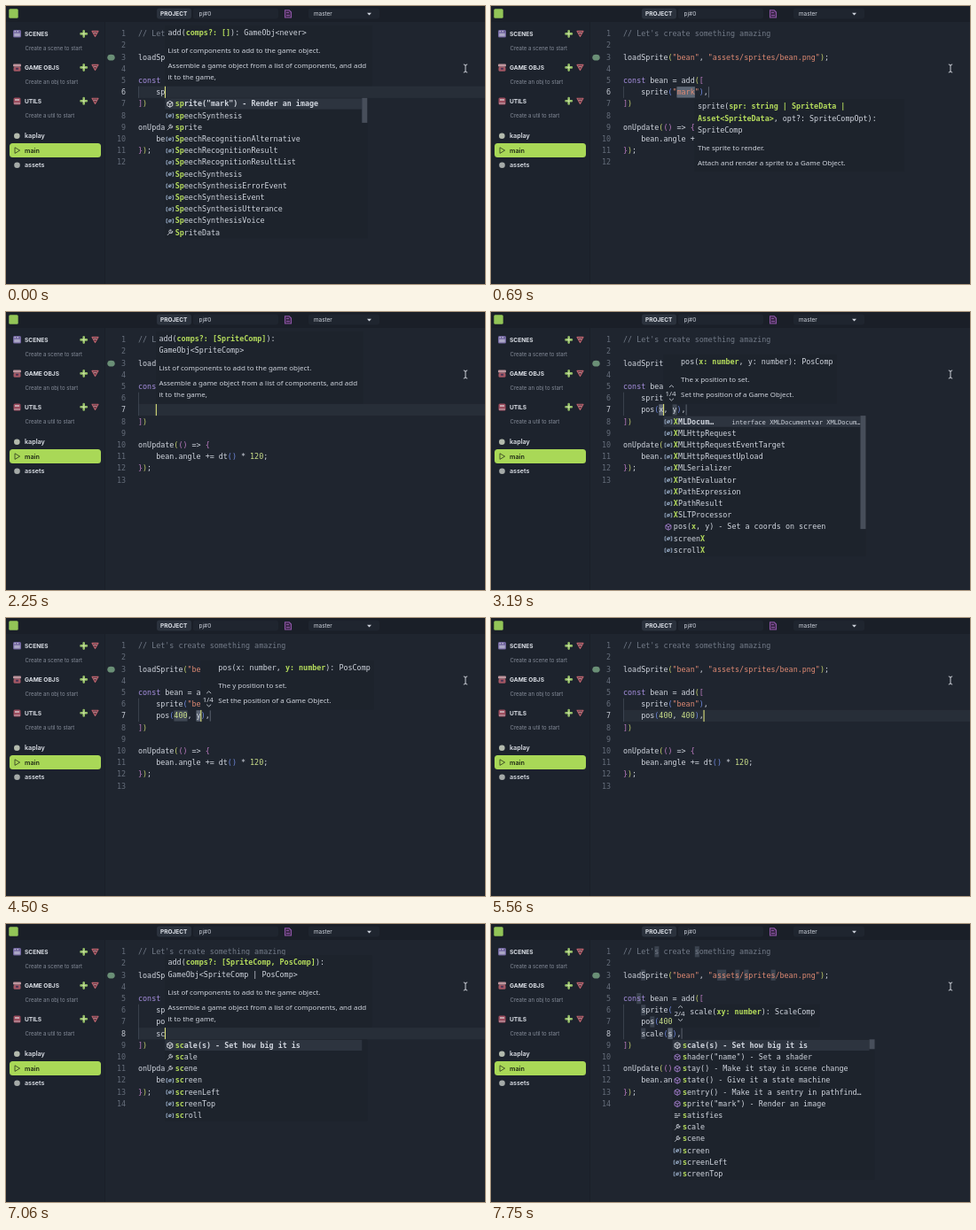
An HTML page that plays this animation: 540x314 px, repeating every 8000 ms.

```html
<!DOCTYPE html>
<html lang="en">
<head>
<meta charset="utf-8">
<title>Code editor</title>
<style>
  html, body { margin: 0; width: 100%; height: 100%; overflow: hidden; background: #1f252f; }
  svg { display: block; width: 540px; height: 314px; }
  text { white-space: pre; font: 8.39px "DejaVu Sans Mono", monospace; fill: #d0d5de; }
  .ui { font-family: Inter, sans-serif; }
  .doc { font: 7.96px "Noto Sans", sans-serif; }
  .b { font-weight: 700; }
  .hit { font-weight: 700; fill: #b5dc5c; }
</style>
</head>
<body>
<svg viewBox="0 0 540 314" xmlns="http://www.w3.org/2000/svg">
  <g id="shell"></g>
  <g id="editor"></g>
  <g id="pointer" fill="none" stroke="#c9cdd5" stroke-width="1">
    <path d="M515.8 66q2.2 0 2.2 1.4q0-1.4 2.2-1.4M518 67v7M515.8 75q2.2 0 2.2-1.4q0 1.4 2.2 1.4"/>
  </g>
</svg>
<script>
const LOOP = 8000, CW = 5.05, LH = 13.2, LEFT = 149, TOP = 24.7, INDENT = 4;
const $ = id => document.getElementById(id);
const esc = s => s.replace(/&/g, '&amp;').replace(/</g, '&lt;').replace(/>/g, '&gt;');
const rect = (x, y, w, h, fill, more = '') =>
  `<rect x="${x}" y="${y}" width="${w}" height="${h}" fill="${fill}" ${more}/>`;
const path = (d, stroke, more = 'fill="none"') => `<path d="${d}" stroke="${stroke}" ${more}/>`;
const span = (s, fill) => `<tspan fill="${fill}">${esc(s)}</tspan>`;
// y is the visual middle of the line
const raw = (x, y, inner, more = '') => `<text x="${x}" y="${y + 2.9}" ${more}>${inner}</text>`;
const ui = (x, y, s, size, fill, weight = 400) =>
  `<text class="ui" x="${x}" y="${y + size * .36}" style="font-size:${size}px;font-weight:${weight};fill:${fill}">${esc(s)}</text>`;

/* ---------- static shell ---------- */
function section(y, title, hint, icon) {
  return icon + ui(21, y, title, 6.6, '#dde1e8', 700) + ui(21.5, y + 16.2, hint, 6, '#858c99') +
    path(`M87.7 ${y - 3.2}v6.4M84.5 ${y}h6.4`, '#93bd66', 'stroke-width="2.6" stroke-linecap="round"') +
    path(`M87.7 ${y - 2}v4M85.7 ${y}h4`, '#d3e6ae', 'stroke-width=".8"') +
    path(`M97 ${y - 3}h7l-3.5 6.2z`, '#b9626d', 'fill="#5f343f" stroke-width="1.1" stroke-linejoin="round"') +
    path(`M98.8 ${y - 1}h3.4`, '#d9aab0', 'stroke-width=".8"');
}

function shell() {
  const scenes = rect(8, 27, 9, 8.5, '#72669f', 'rx="1.5"') + rect(9.2, 30.8, 6.6, 3.6, '#aaa6c4') +
    path('M9.5 28.8h1.5M12.5 28.8h1.5', '#d8d8e4');
  const objs = rect(8.5, 68.4, 8, 5.3, '#a35764', 'rx="1.5"') + rect(8, 65.4, 9, 3, '#bf959d', 'rx="1"') +
    rect(11, 69.8, 3, 2, '#4d3656');
  const utils = rect(8.5, 103.4, 8, 8.2, '#9c4d5e', 'rx="1.5"') + rect(10, 105, 5, 2, '#c4a4ac') +
    path('M9 110h7', '#c4b6bd', 'stroke-width=".9"');
  return rect(0, 0, 540, 314, '#1f252f') +
    rect(0, 0, 540, 18, '#1a1f28') + rect(0, 18, 111, 296, '#1d232d') +
    rect(111, 18, 1, 296, '#1a1f28') +
    rect(3.3, 3.3, 10.4, 10.4, '#93c557', 'rx="1.5"') +
    rect(170, 2.5, 39, 12, '#2b323d', 'rx="3"') + ui(174, 8.9, 'PROJECT', 6.5, '#dde1e8', 700) +
    rect(211, 2.5, 96, 12, '#1f252f', 'rx="3"') + ui(217.5, 8.9, 'pj#0', 6.5, '#c9ced8') +
    path('M314.5 4.8h4.8l2.2 2.2v6h-7z', '#8d55a6', 'fill="#3b2748" stroke-width="1.1"') +
    path('M316 7.4h3M316 10.6h4', '#8d55a6') +
    rect(341, 2.5, 80, 12, '#1f252f', 'rx="3"') + ui(347, 8.9, 'master', 6.4, '#d0d5de') +
    '<path d="M407 7.8h5l-2.5 2.8z" fill="#d0d5de"/>' +
    section(31.4, 'SCENES', 'Create a scene to start', scenes) +
    section(69.4, 'GAME OBJS', 'Create an obj to start', objs) +
    section(107.3, 'UTILS', 'Create a util to start', utils) +
    '<circle cx="12.3" cy="146.7" r="3.3" fill="#b3baad"/>' + ui(21, 146.5, 'kaplay', 7.2, '#dde1e8', 600) +
    rect(4, 155, 103, 16, '#a9d857', 'rx="3.5"') +
    path('M10 159.8l5.6 3.3l-5.6 3.3z', '#3a4a24', 'fill="none" stroke-width=".9" stroke-linejoin="round"') +
    ui(21, 163, 'main', 7.2, '#1d2615', 600) +
    '<circle cx="12.5" cy="179.7" r="3.3" fill="#a5aaa8"/>' + ui(21, 179.5, 'assets', 7.1, '#dde1e8', 600);
}

/* ---------- document ---------- */
const HEAD = ["// Let's create something amazing", '', 'loadSprite("bean", "assets/sprites/bean.png");', '', 'const bean = add(['];
const TAIL = ['])', '', 'onUpdate(() => {', '    bean.angle += dt() * 120;', '});', ''];
const DONE = ['sprite("bean"),', 'pos(400, 400),'];
const BRACKETS = ['#c3cf6c', '#bd7cc2', '#6f88dd'];
const TOKEN = /\/\/.*|"[^"]*"|\bconst\b|\b\d+\b|[()[\]{}]|[\w.]+|[^\w"()[\]{}]/g;

function paint(line, nest) {
  return (line.match(TOKEN) || []).map(t => {
    if (t.startsWith('//')) return span(t, '#737b88');
    if (t[0] === '"') return span(t, '#df8a73');
    if (t === 'const') return span(t, '#a78fdf');
    if (/^\d/.test(t)) return span(t, '#cbe08a');
    if ('([{'.includes(t)) return span(t, BRACKETS[nest.depth++ % 3]);
    if (')]}'.includes(t)) return span(t, BRACKETS[--nest.depth % 3]);
    return esc(t);
  }).join('');
}

/* ---------- signature hints ---------- */
const ADD_DOC = [['List of components to add to the game object.'],
  ['Assemble a game object from a list of components, and add', 'it to the game,']];
const add = (...sig) => ({ sig, doc: ADD_DOC, w: 233 });
const POS_END = 'Set the position of a Game Object.';
const SIG = {
  empty: add('add(*comps?: []*): GameObj<never>'),
  one: add('add(*comps?: [SpriteComp]*):', 'GameObj<SpriteComp>'),
  any: add('add(*comps?: [SpriteComp, any]*):', 'GameObj<any>'),
  two: add('add(*comps?: [SpriteComp, PosComp]*):', 'GameObj<SpriteComp | PosComp>'),
  sprite: {
    sig: ['sprite(*spr: string | SpriteData |*', '*Asset<SpriteData>*, opt?: SpriteCompOpt):', 'SpriteComp'],
    doc: [['The sprite to render.'], ['Attach and render a sprite to a Game Object.']], w: 236, below: true
  },
  posX: { sig: ['pos(*x: number*, y: number): PosComp'], doc: [['The x position to set.'], [POS_END]], w: 195, pick: '1/4' },
  posY: { sig: ['pos(x: number, *y: number*): PosComp'], doc: [['The y position to set.'], [POS_END]], w: 195, pick: '1/4' },
  scale: { sig: ['scale(*xy: number*): ScaleComp'], doc: [], w: 166, pick: '2/4' }
};

function hint({ sig, doc, w, below, pick }, x, lineTop) {
  const ys = sig.map((_, i) => i * LH);
  let y = ys[ys.length - 1];
  doc.forEach((par, p) => par.forEach((_, i) => ys.push(y += i ? 13 : p ? 17 : 20)));
  const pad = doc.length ? 10.5 : 18;
  const first = below ? lineTop + LH + 9.6 : lineTop - pad - y;
  const top = first - 8.2, bottom = first + y + pad - .4;
  const tx = x + (pick ? 19.6 : 3.2);
  let out = rect(x, top, w, bottom - top, '#1d232c');
  if (pick) {
    const py = bottom - (doc.length ? 11.8 : 15.4), cx = x + 9;
    out += raw(x + 2, py, pick, 'class="doc"') +
      path(`M${cx - 2.5} ${py - 6.6}l2.5-2.3l2.5 2.3M${cx - 2.5} ${py + 6}l2.5 2.3l2.5-2.3`, '#c5cad4', 'fill="none" stroke-width=".9"');
  }
  sig.forEach((s, i) => {
    const parts = s.split('*').map((p, k) => k % 2 ? `<tspan class="hit">${esc(p)}</tspan>` : esc(p));
    out += raw(tx, first + ys[i], parts.join(''));
  });
  doc.flat().forEach((s, i) => out += raw(tx, first + ys[sig.length + i], esc(s), 'class="doc"'));
  return out;
}

/* ---------- completion lists: leading mark picks the icon ---------- */
const SPRITE = '#sprite("mark") - Render an image', POS = '#pos(x, y) - Set a coords on screen';
const vars = (pre, names) => names.split(' ').map(n => '=' + pre + n);
const LIST = {
  sp: { find: 'sp', bar: 28, rows: [SPRITE, '=speechSynthesis', '~sprite', ...vars('Speech',
    'RecognitionAlternative RecognitionResult RecognitionResultList Synthesis SynthesisErrorEvent SynthesisEvent SynthesisUtterance SynthesisVoice'), '~SpriteData'] },
  spr: { find: 'spr', rows: [SPRITE, '~sprite', '~SpriteData'] },
  p: { find: 'p', bar: 20, rows: [POS, '#play("name") - Play a sound', ...vars('p', 'arent arseInt arseFloat erformance rint rompt'),
    '~pos', '~polygon', '=postMessage', '~patrol'] },
  po: { find: 'po', rows: [POS, '~pos', '~polygon', '=postMessage', '=PointerEvent', '=PopStateEvent'] },
  pos: { find: 'pos', rows: [POS, '~pos', '=postMessage'] },
  x: { find: 'x', bar: 128, detail: 'interface XMLDocumentvar XMLDocum…', rows: [...vars('X',
    'MLDocum… MLHttpRequest MLHttpRequestEventTarget MLHttpRequestUpload MLSerializer PathEvaluator PathExpression PathResult SLTProcessor'),
    POS, '=screenX', '=scrollX'] },
  y: { find: 'y', rows: ['~yield', POS, '=screenY', '=scrollY', '=history', '~body', '~play'] },
  s: { find: 's', bar: 11, rows: ['#scale(s) - Set how big it is', '#shader("name") - Set a shader',
    '#stay() - Make it stay in scene change', '#state() - Give it a state machine',
    '#sentry() - Make it a sentry in pathfind…', SPRITE, '-satisfies', '~scale', '~scene', '=screen', '=screenLeft', '=screenTop'] },
  sc: { find: 'sc', rows: ['#scale(s) - Set how big it is', '~scale', '~scene', '=screen', '=screenLeft', '=screenTop', '=scroll'] }
};

function icon(kind, x, y, on) {
  const at = (d, c) => `<g transform="translate(${x} ${y})">${path(d, c, 'fill="none" stroke-width=".9" stroke-linejoin="round"')}</g>`;
  switch (kind) {
    case '#': return at('M0-3.4L3-1.8V1.8L0 3.4L-3 1.8V-1.8zM-3-1.8L0 0L3-1.8M0 0V3.4', on ? '#e2e5eb' : '#a57fd0');
    case '=': return at('M-2.6-2.2h-1.2v4.4h1.2M2.6-2.2h1.2v4.4h-1.2M-1.5 0a1.5 1.3 0 1 0 3 0a1.5 1.3 0 1 0-3 0M-1.6 1.6L1.6-1.6', '#9fb4d0');
    case '~': return at('M-3 3L.4-.4M3-1.6a2 2 0 1 1-1.6-1.6L.8-1.6L1.7-.8z', '#c3c8d1');
    default: return at('M-3.2-2h3M1-2h2.2M-3.2 0h6.4M-3.2 2h4', '#c3c8d1');
  }
}

function popup({ rows, find, bar, detail }, x, top) {
  const h = rows.length * LH, w = 228;
  let out = rect(x, top, w, h, '#1d232c') + rect(x, top + .5, w - 6, LH - 1, '#2d343f');
  rows.forEach((row, i) => {
    const y = top + LH * (i + .5), s = row.slice(1), k = s.toLowerCase().indexOf(find), e = k + find.length;
    out += icon(row[0], x + 5.5, y + .3, !i) +
      raw(x + 11.4, y, `${esc(s.slice(0, k))}<tspan class="hit">${esc(s.slice(k, e))}</tspan>${esc(s.slice(e))}`, i ? '' : 'class="b"');
  });
  if (detail) out += raw(x + 77, top + LH / 2, esc(detail), 'style="font-size:7.1px"');
  return bar ? out + rect(x + w - 6, top, 6, bar, '#474e5a') : out;
}

/* ---------- timeline: time, row, text, cursor column, extras ---------- */
const STEPS = [
  [0, 0, 'sp', 2, { sig: 'empty', pop: 'sp' }],
  [60, 0, 'spr', 3, { sig: 'empty', pop: 'spr' }],
  [190, 0, 'sprite("mark"),', 12, { sel: 4 }],
  [310, 0, 'sprite("mark"),', 12, { sel: 4, sig: 'sprite' }],
  ...typed('sprite("', 'bean', '"),', 0, [880, 1000, 1120, 1250], 'sprite'),
  [1500, 0, DONE[0], 15, {}],
  [2000, 1, '', 0, {}],
  [2190, 1, '', 0, { sig: 'one' }],
  [2440, 1, 'p', 1, { sig: 'one' }],
  [2500, 1, 'p', 1, { sig: 'one', pop: 'p' }],
  [2560, 1, 'po', 2, { sig: 'one', pop: 'po' }],
  [2690, 1, 'pos', 3, { sig: 'one', pop: 'pos' }],
  [2810, 1, 'pos', 3, { sig: 'any', pop: 'pos' }],
  [3060, 1, 'pos(x, y),', 5, { sel: 1 }],
  [3130, 1, 'pos(x, y),', 5, { sel: 1, sig: 'posX', pop: 'x' }],
  ...typed('pos(', '400', ', y),', 1, [3680, 3940, 4130], 'posX'),
  [4380, 1, 'pos(400, y),', 10, { sel: 1, sig: 'posY' }],
  [4560, 1, 'pos(400, y),', 10, { sel: 1, sig: 'posY', pop: 'y' }],
  ...typed('pos(400, ', '400', '),', 1, [4690, 4940, 5060], 'posY'),
  [5440, 1, DONE[1], 14, {}],
  [5940, 2, '', 0, {}],
  [6060, 2, '', 0, { sig: 'two' }],
  [6810, 2, 's', 1, { sig: 'two' }],
  [6870, 2, 's', 1, { sig: 'two', pop: 's' }],
  [6940, 2, 'sc', 2, { sig: 'two', pop: 'sc' }],
  [7130, 2, 'scale(s),', 7, { sel: 1 }],
  [7250, 2, 'scale(s),', 7, { sel: 1, sig: 'scale' }],
  [7320, 2, 'scale(s),', 7, { sel: 1, sig: 'scale', pop: 's' }]
];

function typed(before, word, after, row, times, sig) {
  return times.map((t, i) => [t, row, before + word.slice(0, i + 1) + after, before.length + i + 1, { sig }]);
}

function draw([, row, text, col, { sel, sig, pop }], caretOn) {
  const lines = [...HEAD, ...[...DONE.slice(0, row), text].map(s => ' '.repeat(INDENT) + s), ...TAIL];
  const now = HEAD.length + row, top = TOP + now * LH;
  const colX = c => LEFT + c * CW, x = colX(col + INDENT);
  const nest = { depth: 0 };
  // the current line is only tinted while nothing is selected
  let out = sel ? '' : rect(LEFT, top, 540 - LEFT, LH, '#272e38');
  out += rect(LEFT, TOP + HEAD.length * LH, .7, (row + 1) * LH, '#464d59');

  // snippet fields
  const open = text.indexOf('(');
  if (open > 0 && col < text.length) {
    for (const m of text.slice(open).matchAll(/\w+/g))
      out += rect(colX(INDENT + open + m.index), top + .5, m[0].length * CW, LH - 1, '#3f4753');
    out += rect(colX(INDENT + text.length), top + .5, .8, LH - 1, '#68707d');
  }
  // selection and equal text elsewhere
  if (sel) {
    const word = text.slice(col - sel, col).toLowerCase();
    lines.forEach((line, i) => {
      for (const m of line.toLowerCase().matchAll(new RegExp(word, 'g')))
        out += rect(colX(m.index), TOP + i * LH + .5, sel * CW, LH - 1, '#3b434f');
    });
    out += rect(x - sel * CW, top + .5, sel * CW, LH - 1, '#5d6674');
  }
  lines.forEach((line, i) => {
    const y = TOP + LH * (i + .5);
    out += raw(135, y, i + 1, `text-anchor="end" style="fill:${i === now ? '#c5cad3' : '#656d7a'}"`) +
      raw(LEFT, y, paint(line, nest));
  });
  out += '<ellipse cx="118.5" cy="58.2" rx="4.2" ry="3.4" fill="#6a8f76"/>';
  if (caretOn) out += rect(x - .4, top, 1.1, LH, '#dbe07c');
  if (sig) out += hint(SIG[sig], x, top);
  if (pop) out += popup(LIST[pop], x, top + LH);
  return out;
}

// time of the last caret move, which restarts the blink
const moved = [];
STEPS.forEach((s, i) => {
  const p = STEPS[i - 1];
  moved[i] = p && p[1] === s[1] && p[2] === s[2] && p[3] === s[3] ? moved[i - 1] : s[0];
});

$('shell').innerHTML = shell();
let shown = '';
function tick() {
  const t = performance.now() % LOOP;
  const i = STEPS.findLastIndex(s => s[0] <= t);
  const caretOn = Math.floor((t - moved[i]) / 500) % 2 === 0;
  const key = i + '|' + caretOn;
  if (key !== shown) {
    shown = key;
    $('editor').innerHTML = draw(STEPS[i], caretOn);
  }
  requestAnimationFrame(tick);
}
tick();
</script>
</body>
</html>
```
